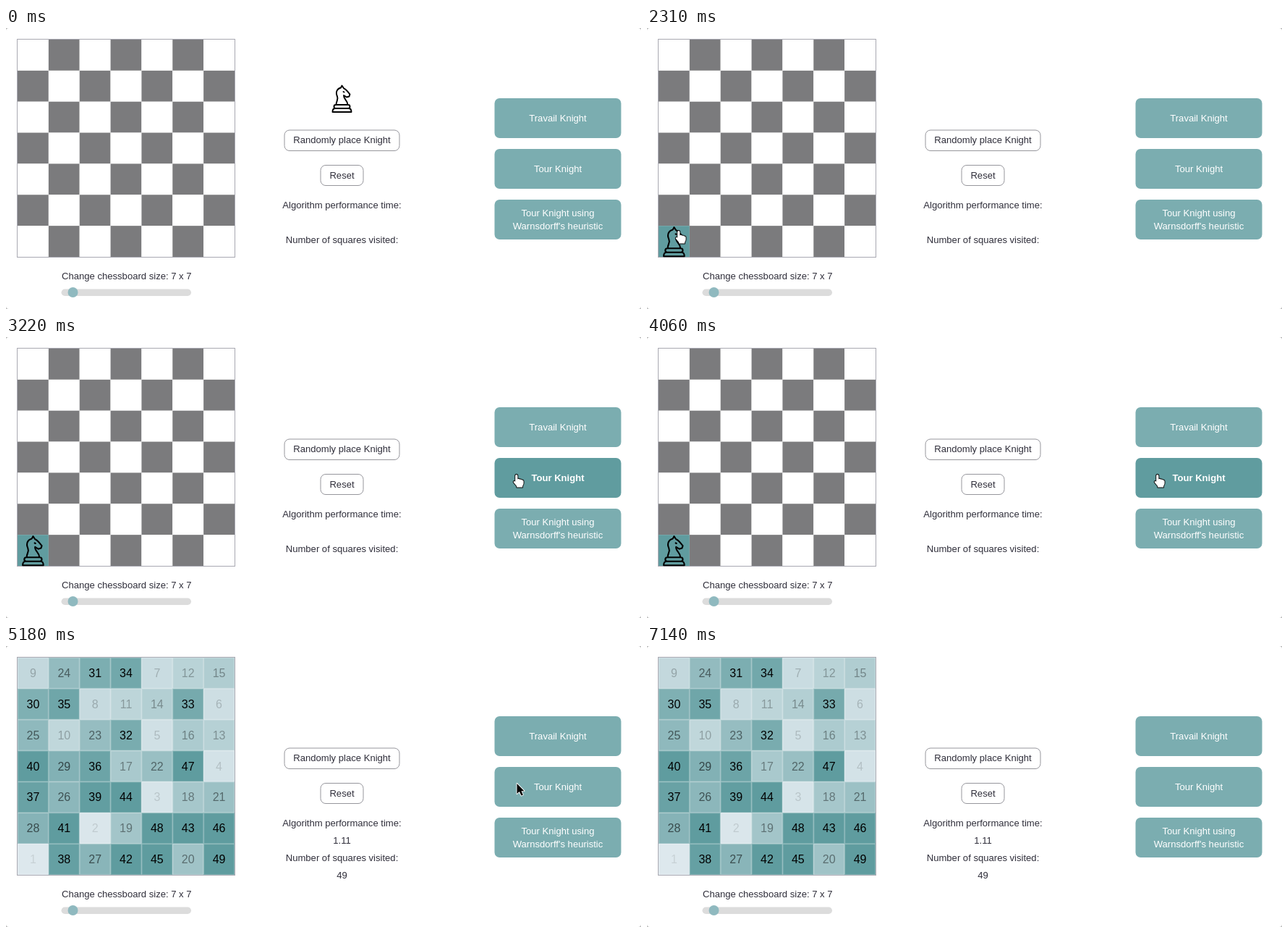
Write an HTML page with a canvas that moves like this. It is 878 px wide and 388 px high and loops after 7280 ms.

```html
<!DOCTYPE html>
<html lang="en">
<head>
<meta charset="utf-8">
<title>Knight's tour</title>
<style>
  html, body { margin: 0; width: 100%; height: 100%; overflow: hidden; background: #fff; }
  canvas { display: block; }
</style>
</head>
<body>
<canvas id="stage" width="878" height="388"></canvas>
<script>
const ctx = document.getElementById('stage').getContext('2d');
const LOOP = 7280, STEP = 70;
const FONT = '"Liberation Sans", Arial, sans-serif';
const TEAL = '#609c9f', SOFT_TEAL = '#7badb0', INK = '#2f2e3a';
const BOARD = { x: 16, y: 16, n: 7, cell: 300 / 7 };

const TOUR = [
  [9, 24, 31, 34, 7, 12, 15],
  [30, 35, 8, 11, 14, 33, 6],
  [25, 10, 23, 32, 5, 16, 13],
  [40, 29, 36, 17, 22, 47, 4],
  [37, 26, 39, 44, 3, 18, 21],
  [28, 41, 2, 19, 48, 43, 46],
  [1, 38, 27, 42, 45, 20, 49]
];

// Times at which the state of the page changes.
const AT = { enter: 280, press: 1050, hoverCell: 1260, place: 1820, leaveBoard: 2310,
             hoverTour: 3010, click: 3920, busy: 5110, solved: 5180, exit: 7000 };

// Pointer positions: time, x, y.
const POINTER = [
  [280, 326, 379], [420, 215, 340], [560, 95, 303], [770, 27, 290],
  [2240, 27, 290], [2310, 44, 280], [2520, 210, 208], [2730, 470, 142],
  [2870, 610, 140], [3010, 686, 176], [3220, 706, 190],
  [6020, 706, 190], [6230, 677, 197], [6510, 580, 265], [6790, 473, 361], [7000, 440, 392]
];

const KNIGHT = new Path2D(
  'M6 27.5C6 22 9.500 20.500 7.500 16C4.500 9.500 8 5 12.500 4L14 1L16.500 4.800' +
  'C20 6 22 9.500 25 13L24 16L20.500 17L16.500 14.500C16 20 22 21 22 27.500' +
  'M5.500 27.500H22.500A2.500 2.500 0 0 1 22.500 32.500H5.500A2.500 2.500 0 0 1 5.500 27.500Z' +
  'M4 32.500H24Q27 33 27 37.500H1Q1 33 4 32.500ZM16 9.500L17 10');
const ARROW = new Path2D('M0 0V14L3.300 11L6 16.500L8.400 15.500L6 10.200H10Z');
const HAND = new Path2D(
  'M-1.800 9.500V1.500A1.500 1.500 0 0 1 1.400 1.500V6.500Q3 4.800 4.400 6.800Q6 5.800 7.200 7.600' +
  'Q9.500 7 9.600 9.500V12Q9.500 14 8.200 15.500V17.500H.2V16Q-2 13.500-4.300 10.500Q-4.500 8-1.800 9.500Z');

function text(str, x, y, { size = 13.08, color = INK, align = 'center', bold = false } = {}) {
  ctx.font = `${bold ? 'bold ' : ''}${size}px ${FONT}`;
  ctx.textAlign = align;
  ctx.fillStyle = color;
  ctx.fillText(str, x, y);
}

function roundBox(x, y, w, h, r, fill, stroke) {
  ctx.beginPath();
  ctx.roundRect(x, y, w, h, r);
  ctx.fillStyle = fill;
  ctx.fill();
  if (stroke) {
    ctx.strokeStyle = stroke;
    ctx.lineWidth = 1;
    ctx.stroke();
  }
}

function shape(path, x, y, scale, stroke, width, fill) {
  ctx.save();
  ctx.translate(x, y);
  ctx.scale(scale, scale);
  ctx.lineJoin = ctx.lineCap = 'round';
  ctx.strokeStyle = stroke;
  ctx.lineWidth = width;
  ctx.stroke(path);
  if (fill) {
    ctx.fillStyle = fill;
    ctx.fill(path);
  }
  ctx.restore();
}

function drawTourCell(n, x, y) {
  const shade = Math.min(1, n * 0.025);
  const mix = (from, to) => Math.round(from + (to - from) * shade);
  const size = BOARD.cell;
  ctx.fillStyle = `rgb(${mix(224, 95)},${mix(234, 156)},${mix(239, 159)})`;
  ctx.fillRect(x, y, size, size);
  ctx.strokeStyle = 'rgba(255,255,255,.22)';
  ctx.lineWidth = 1;
  ctx.strokeRect(x + 0.5, y + 0.5, size - 1, size - 1);
  const alpha = n < 30 ? 0.08 + 0.018 * n : 1;
  text(n, x + size / 2, y + size / 2 + 5.5, { size: 16, color: `rgba(0,0,0,${alpha})` });
}

function drawBoard(t) {
  const { x: left, y: top, n, cell } = BOARD;
  for (let row = 0; row < n; row++) {
    for (let col = 0; col < n; col++) {
      const x = left + col * cell, y = top + row * cell;
      if (t >= AT.solved) {
        drawTourCell(TOUR[row][col], x, y);
      } else {
        const active = t >= AT.hoverCell && row === n - 1 && col === 0;
        ctx.fillStyle = active ? TEAL : (row + col) % 2 ? '#7b7b7d' : '#fff';
        ctx.fillRect(x, y, cell, cell);
      }
    }
  }
  ctx.strokeStyle = '#a9a9b2';
  ctx.lineWidth = 1;
  ctx.strokeRect(15.5, 15.5, 301, 301);

  if (t < AT.place) shape(KNIGHT, 450.5, 78.5, 1, '#000', 1.9);
  else if (t < AT.solved) shape(KNIGHT, 22, 274, 1.1, '#000', 1.9);
}

function drawControls(t) {
  text('Change chessboard size: 7 x 7', 77, 346.5, { align: 'left' });
  roundBox(76.5, 360.5, 179.5, 9.5, 4.75, '#dcdcdc');
  roundBox(85.5, 358, 14, 14, 7, '#8fb9bf');

  roundBox(385, 141, 159, 28.5, 7, '#fff', '#96969c');
  text('Randomly place Knight', 464.5, 159);
  roundBox(435, 189.500, 59, 28, 7, '#fff', '#96969c');
  text('Reset', 464.5, 207.5);
  text('Algorithm performance time:', 464.5, 248.5);
  text('Number of squares visited:', 464.5, 297);
  if (t >= AT.solved) {
    text('1.11', 464.5, 272.5);
    text('49', 464.5, 320.5);
  }
}

function drawActions(t) {
  const hover = t >= AT.hoverTour && t < AT.solved;
  const white = { color: '#fff' };
  roundBox(675.5, 97, 175, 55, 7, SOFT_TEAL);
  text('Travail Knight', 763, 128.5, white);
  roundBox(675.5, 167, 175, 55, 7, hover ? TEAL : SOFT_TEAL);
  text('Tour Knight', 763, 198.5, { color: '#fff', bold: hover });
  roundBox(675.5, 237, 175, 55, 7, SOFT_TEAL);
  text('Tour Knight using', 763, 259.5, white);
  text("Warnsdorff's heuristic", 763, 277.5, white);
}

function pointerAt(t) {
  const i = POINTER.findIndex(p => p[0] >= t);
  if (i <= 0) return POINTER[0].slice(1);
  const [t0, x0, y0] = POINTER[i - 1], [t1, x1, y1] = POINTER[i];
  const k = (t - t0) / (t1 - t0);
  return [x0 + (x1 - x0) * k, y0 + (y1 - y0) * k];
}

function drawRing(x, y, released) {
  ctx.beginPath();
  ctx.arc(x, y, released ? 31 : 21.5, 0, Math.PI * 2);
  ctx.strokeStyle = released ? 'rgba(0,0,0,.35)' : '#000';
  ctx.lineWidth = 1.7;
  ctx.stroke();
}

function drawPointer(t) {
  if (t < AT.enter || t >= AT.exit) return;
  const [x, y] = pointerAt(t);
  for (const [down, up] of [[AT.press, AT.place], [AT.click, AT.click + STEP]]) {
    if (t >= down && t < up + STEP) drawRing(x, y, t >= up);
  }
  const overBoard = t >= AT.hoverCell && x < 317;
  const overButton = t >= AT.hoverTour && t < AT.busy;
  if (overBoard || overButton) shape(HAND, x, y, 1, '#000', 1.8, '#fff');
  else shape(ARROW, x + 0.5, y, 1, '#fff', 1.8, '#000');
}

function draw(t) {
  ctx.fillStyle = '#b4b4b4';
  ctx.fillRect(0, 0, 878, 388);
  roundBox(0, 0, 878, 388, 4, '#fff');
  drawBoard(t);
  drawControls(t);
  drawActions(t);
  drawPointer(t);
}

function frame() {
  const t = performance.now() % LOOP;
  draw(Math.floor(t / STEP) * STEP);
  requestAnimationFrame(frame);
}
frame();
</script>
</body>
</html>
```
